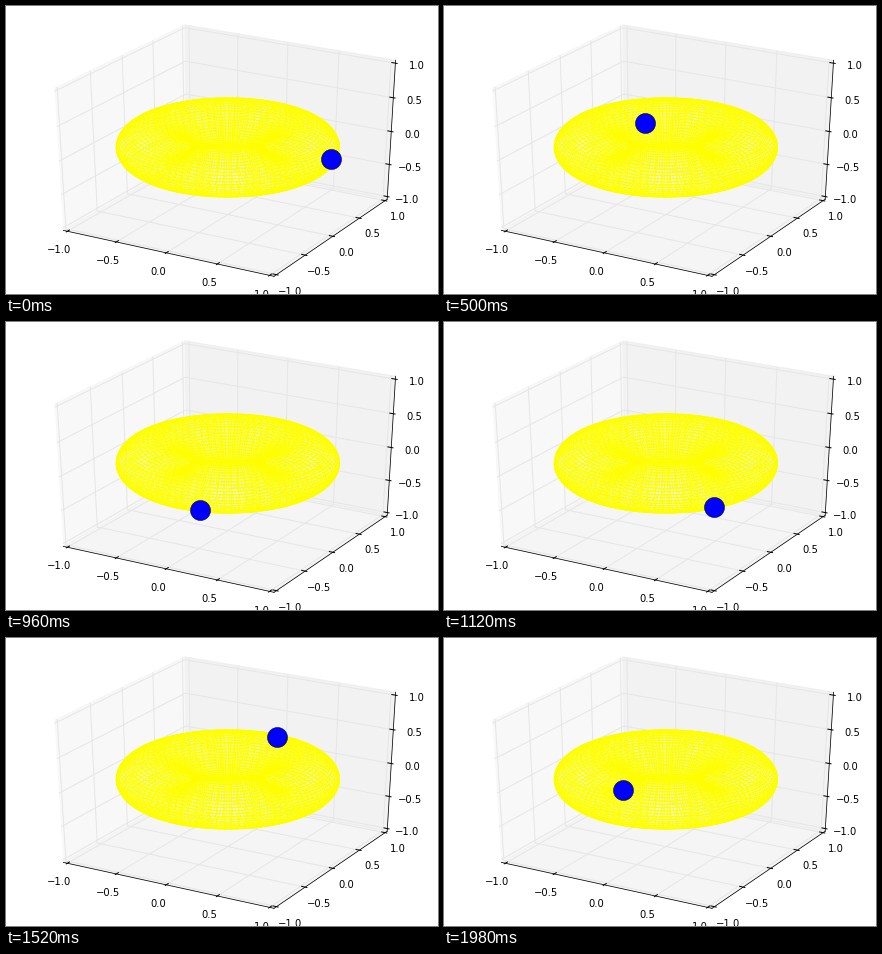
A matplotlib script that plays this animation: 432 by 288 pixels, repeating every 2000 ms.

```python
import numpy as np
import matplotlib.pyplot as plt
from matplotlib.animation import FuncAnimation
from matplotlib.collections import LineCollection
from matplotlib.patches import Polygon

plt.rcParams.update({"font.family": "DejaVu Sans", "font.size": 10})

FRAMES = 100
STEP = 0.1                        # radians per frame
MAJOR, MINOR = 2 / np.pi, 1 / np.pi
DIST, ELEV, AZIM = 10, np.radians(30), np.radians(-60)
EDGE = 1 + 1 / 24                 # panes reach slightly past the limits
CELL = 1 / 6                      # a twelfth of the data range
LABEL = EDGE + 0.8 * CELL
TICKS = np.linspace(-1, 1, 5)


def project(x, y, z):
    """Perspective view of the cube [-1, 1]^3."""
    x, y, z = (np.asarray(v, float) / 2 for v in (x, y, z))
    ca, sa, ce, se = np.cos(AZIM), np.sin(AZIM), np.cos(ELEV), np.sin(ELEV)
    right = -sa * x + ca * y
    up = -se * (ca * x + sa * y) + ce * z
    depth = DIST - (ce * (ca * x + sa * y) + se * z)
    return right / depth, up / depth


def torus(phi, theta):
    rho = MAJOR + MINOR * np.cos(theta)
    return rho * np.cos(phi), rho * np.sin(phi), MINOR * np.sin(theta)


def path(*points):
    return np.column_stack(project(*np.transpose(points)))


fig = plt.figure(figsize=(6, 4), dpi=72, facecolor="white")
ax = fig.add_axes([0, 0, 1, 1])
ax.set(xlim=(-0.095, 0.09), ylim=(-0.095, 0.09))
ax.axis("off")

# panes
E = EDGE
panes = [
    (0.95, [(-E, -E, -E), (-E, E, -E), (-E, E, E), (-E, -E, E)]),
    (0.90, [(-E, E, -E), (E, E, -E), (E, E, E), (-E, E, E)]),
    (0.925, [(-E, -E, -E), (E, -E, -E), (E, E, -E), (-E, E, -E)]),
]
for grey, corners in panes:
    ax.add_patch(Polygon(path(*corners), closed=False, color=(grey,) * 3,
                         alpha=0.5, lw=1, zorder=1))

# grid
grid = []
for t in TICKS:
    grid += [path((t, -E, -E), (t, E, -E), (t, E, E)),
             path((E, t, -E), (-E, t, -E), (-E, t, E)),
             path((-E, -E, t), (-E, E, t), (E, E, t))]
ax.add_collection(LineCollection(grid, colors="0.9", linewidths=1, zorder=2))


# axis lines, ticks and labels
def draw_axis(place, outward):
    """place(t, e) is the point at value t on the edge at distance e."""
    ax.plot(*path(place(-E, E), place(E, E)).T, color="k", lw=0.75, zorder=3)
    for t in TICKS:
        base = np.array(place(t, E))
        out = np.array(outward) * CELL
        ax.plot(*path(base + 0.1 * out, base - 0.2 * out).T,
                color="k", lw=1, zorder=3)
        x, y = project(*place(t, LABEL))
        ax.text(x, y, f"{t:.1f}".replace("-", "\u2212"),
                ha="center", va="top", zorder=3)


draw_axis(lambda t, e: (t, -e, -e), (0, -1, 0))
draw_axis(lambda t, e: (e, t, -e), (1, 0, 0))
draw_axis(lambda t, e: (e, e, t), (1, 0, 0))

# wireframe
phi, theta = np.meshgrid(np.linspace(0, 2 * np.pi, 100),
                         np.linspace(0, 2 * np.pi, 50))
mesh = np.stack(project(*torus(phi, theta)), axis=-1)
wires = [*mesh, *mesh.transpose(1, 0, 2)]
ax.add_collection(LineCollection(wires, colors=[(1, 1, 0)], linewidths=1,
                                 zorder=4))

ball, = ax.plot([], [], "o", ms=20, mfc=(0, 0, 1), mec="k", mew=0.5, zorder=5)


def update(i):
    t = STEP * (i + 1)
    x, y = project(*torus(t, t))
    ball.set_data([x], [y])
    return ball,


anim = FuncAnimation(fig, update, frames=FRAMES, interval=1000 // 50, repeat=True)
plt.show()
```
